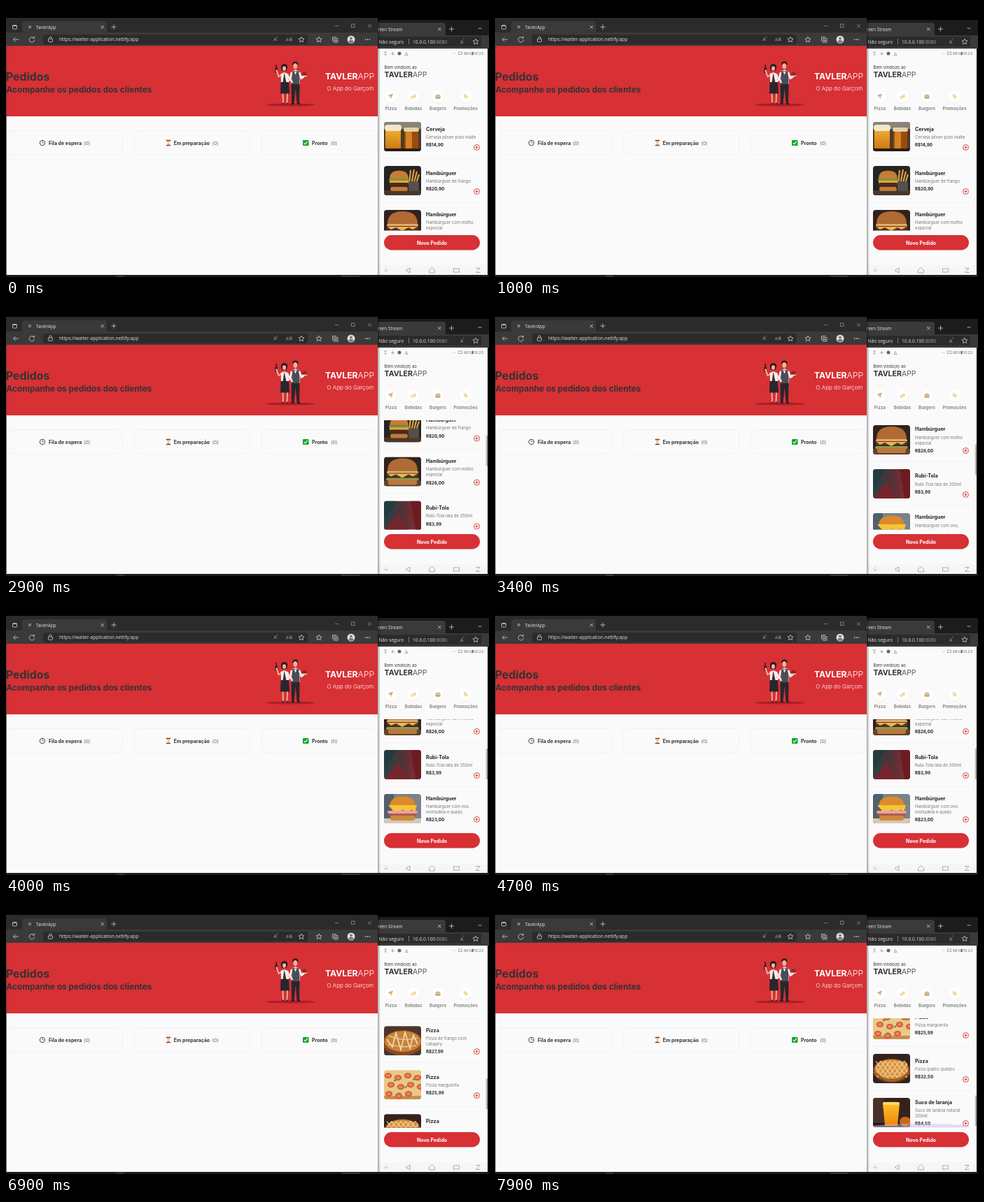
These frames come from a looping animation (690 by 388 pixels, 8 s). An HTML page:

```html
<!DOCTYPE html>
<html lang="pt-BR">
<head>
<meta charset="utf-8">
<title>TavlerApp</title>
<style>
html, body { margin: 0; width: 100%; height: 100%; overflow: hidden; background: #000; }
svg { display: block; }
text { font-family: Inter, sans-serif; white-space: pre; }
.ui { font-family: "Open Sans", sans-serif; font-size: 6.2px; fill: #e4e4e4; }
.url { font-size: 6.7px; }
.dim { fill: #a5a5a5; }
.line { fill: none; stroke: #d0d0d0; stroke-width: .8; }
.nav { fill: none; stroke: #999; stroke-width: .8; }
.b { font-weight: 700; }
.light { font-weight: 300; }
.dark { fill: #333; }
.mid { text-anchor: middle; }
.card { fill: #fafafa; stroke: #f0f0f0; stroke-width: .9; }
.label { font-size: 7px; }
.count { font-size: 6.8px; fill: #666; }
.cat { font-size: 6.2px; font-weight: 700; fill: #858585; text-anchor: middle; }
.name { font-size: 7.1px; font-weight: 700; fill: #222; }
.desc { font-size: 5.95px; fill: #777; }
.price { font-size: 6.2px; font-weight: 700; fill: #222; }
.status { font-size: 5.3px; fill: #666; }
</style>
</head>
<body>
<svg width="690" height="388" viewBox="0 0 690 388">
  <defs>
    <clipPath id="view"><rect x="531" y="165" width="157" height="156.500"/></clipPath>
    <clipPath id="photo"><rect width="53" height="42" rx="4"/></clipPath>
    <clipPath id="page"><rect y="57" width="531" height="328"/></clipPath>
    <linearGradient id="can"><stop offset="0" stop-color="#2a4145"/><stop offset=".45" stop-color="#4a3438"/><stop offset="1" stop-color="#962730"/></linearGradient>
    <linearGradient id="beer" x2="0" y2="1"><stop offset="0" stop-color="#f6b436"/><stop offset="1" stop-color="#c8730f"/></linearGradient>
    <linearGradient id="juice" x2="0" y2="1"><stop offset="0" stop-color="#ffc02a"/><stop offset="1" stop-color="#ee8406"/></linearGradient>
    <linearGradient id="glow" x2="0" y2="1"><stop offset="0" stop-color="#cdbcf0" stop-opacity=".25"/><stop offset="1" stop-color="#cdbcf0" stop-opacity=".65"/></linearGradient>
    <linearGradient id="shade"><stop offset="0" stop-opacity=".35"/><stop offset="1" stop-opacity="0"/></linearGradient>
  </defs>

  <!-- phone window -->
  <rect x="531" y="20" width="159" height="22" fill="#1c1c1d"/>
  <path d="M531 24h93q4 0 4 4v14h-97z" fill="#3a3a3a"/>
  <rect x="531" y="42" width="159" height="19" fill="#3a3a3a"/>
  <rect x="531" y="44" width="148" height="14" fill="#2b2b2b"/>
  <text class="ui" x="531" y="35.500">reen Stream</text>
  <path class="line" d="M617 31l4.500 4.500m0-4.500l-4.500 4.500M636.500 29.500v7m-3.500-3.500h7M674.500 32h5"/>
  <text class="ui url" x="532.500" y="53.500">Não seguro</text>
  <path class="line" d="M575.500 47v8" opacity=".6"/>
  <text class="ui url" x="581" y="53.500">10.0.0.100<tspan class="dim">:8080</tspan></text>
  <text class="ui url dim" x="649" y="53.500">A<tspan dy="-1.500">⁾</tspan></text>
  <use href="#star" x="224" y="3"/>
  <rect x="531" y="61" width="157" height="324" fill="#fafafa"/>

  <g class="nav" stroke="#777">
    <path d="M540 66h4m-2 0v4m-1.500 0h3M550 68.500h5m-2.500-3v5M570 70.500l2-4 2 4zM639 68h1m1 0h1"/>
    <rect x="646.500" y="66" width="5" height="3.600"/>
  </g>
  <circle cx="562" cy="68" r="2.500" fill="#666"/>
  <text class="status" x="654" y="70">66%</text>
  <rect x="665.500" y="65.800" width="2.200" height="4.400" fill="#666"/>
  <text class="status" x="668.500" y="70">10:23</text>

  <text class="dark" x="540.500" y="90.300" font-size="6">Bem vindo(e) ao</text>
  <text class="dark" x="540.500" y="102.400" font-size="10.600"><tspan class="b">TAVLER</tspan><tspan class="light">APP</tspan></text>

  <g id="cats"></g>
  <g clip-path="url(#view)">
    <g id="list"></g>
    <path id="edge" d="M540 321.500v-3q68-7 137 0v3z" fill="url(#glow)"/>
  </g>
  <rect id="bar" x="685.700" width="2.300" height="44" fill="#b4b4b4"/>

  <rect x="540" y="328" width="137" height="21.500" rx="10.700" fill="#d73035"/>
  <text class="b mid" x="608.500" y="341.500" font-size="7" fill="#fff">Novo Pedido</text>

  <rect x="531" y="371" width="157" height="14" fill="#f6f6f6"/>
  <g class="nav">
    <path d="M540.500 377.500l2.500 2.500 2.500-2.500M543 375v1M577 375v7l-6-3.500zM604.500 378l4-3.500 4 3.500v4h-8zM671 375.500h6l-5.500 6h6"/>
    <rect x="639.500" y="376" width="8" height="5"/>
  </g>
  <rect x="688" y="61" width="2" height="324" fill="#141414"/>
  <rect x="531" y="20" width="4" height="365" fill="url(#shade)"/>

  <!-- browser window -->
  <rect y="17" width="531" height="368" fill="#2b2b2b"/>
  <path d="M23 38V26q0-4 4-4h113q4 0 4 4v12z" fill="#3a3a3a"/>
  <rect y="38" width="531" height="19.500" fill="#3a3a3a"/>
  <rect x="53" y="41" width="378" height="14" rx="3" fill="#2b2b2b"/>
  <rect class="line" x="9.500" y="27.500" width="6" height="5.500" rx="1"/>
  <path class="line" d="M9.500 28.500h6" stroke-width="1.500"/>
  <rect x="32" y="28" width="4" height="4" fill="#777"/>
  <text class="ui" x="43" y="32.500">TavlerApp</text>
  <path class="line" d="M135.500 28l4.500 4.500m0-4.500l-4.500 4.500M154 26.500v7m-3.500-3.500h7"/>
  <g class="line" opacity=".6">
    <path d="M470 28.500h5M517 26l5 5m0-5l-5 5"/>
    <rect x="493.500" y="26" width="4.500" height="4.500"/>
  </g>
  <path class="line" d="M18 48h-7.500m3.200-3.200L10.500 48l3.200 3.200M40 46a3.700 3.700 0 1 0 .7 2.500M40.500 43.500V46H38M61.800 47v-1.500a1.700 1.700 0 0 1 3.400 0V47"/>
  <rect class="line" x="60.500" y="47" width="6" height="4.300" rx=".7"/>
  <text class="ui url" x="76" y="50.300">https://waiter-application.netlify.app</text>
  <text class="ui url dim" x="382.500" y="50.300">A<tspan dy="-1.500">⁾</tspan></text>
  <text class="ui dim" x="400" y="50.300">aあ</text>
  <path id="star" class="line" d="M447 44l1.200 2.600 2.800.3-2.100 1.900.6 2.800-2.500-1.500-2.500 1.500.6-2.800-2.100-1.900 2.800-.3z"/>
  <use href="#star" x="-25"/>
  <path class="line" d="M466.500 50.500v-6h5.500M468.500 46.500h5.500v5.500h-5.500zM471.200 47.500v3.500m-1.700-1.700h3.500"/>
  <circle cx="493" cy="48" r="5.500" fill="#dedede"/>
  <circle cx="493" cy="46.300" r="1.900" fill="#777"/>
  <path d="M489.500 51.500q0-2.700 3.500-2.700t3.500 2.700q-3.500 2.500-7 0z" fill="#777"/>
  <path d="M513 48h1.300m1.500 0h1.300m1.500 0h1.300" stroke="#ddd" stroke-width="1.300"/>

  <g clip-path="url(#page)">
    <rect y="57" width="531" height="328" fill="#fafafa"/>
    <rect y="57" width="531" height="101" fill="#d73035"/>
    <text class="b dark" x="0" y="106.500" font-size="15.800">Pedidos</text>
    <text class="b dark" x=".5" y="123.700" font-size="11.800">Acompanhe os pedidos dos clientes</text>
    <text x="456" y="105.200" font-size="12.200" fill="#fff"><tspan class="b">TAVLER</tspan><tspan class="light">APP</tspan></text>
    <text class="light" x="458.500" y="120.500" font-size="8" fill="#fff">O App do Garçom</text>

    <!-- waitress and waiter -->
    <ellipse cx="406.500" cy="141.500" rx="35.500" ry="2" fill="#a82025"/>
    <path d="M385.300 84h1.800v4l1 1.500v6h-3.800v-6l1-1.500z" fill="#4a1a20"/>
    <path d="M387 94l2.500 7 5-3" fill="none" stroke="#f0b597" stroke-width="2"/>
    <circle cx="386.700" cy="93" r="1.400" fill="#f0b597"/>
    <path d="M393 90q-1-7 4.500-7t4.500 6l-1.500 4h-6z" fill="#2c1d25"/>
    <ellipse cx="397.500" cy="89.500" rx="2.500" ry="3.300" fill="#f0b597"/>
    <path d="M392.500 97l5-2 5 2 1 12.500h-10.500z" fill="#f4ece8"/>
    <path d="M402 97.500l3 8-4 5" fill="none" stroke="#f4ece8" stroke-width="2.300"/>
    <path d="M397.500 95.500l-2 14h5z" fill="#333139"/>
    <path d="M392.500 109h11.500l1 16.500h-13z" fill="#29262e"/>
    <path d="M395.500 125.500l.5 14m6-14l-.5 14" stroke="#f0b597" stroke-width="1.800"/>
    <path d="M393.500 140.500h3.500v-2.500zM399.500 140.500h3.500v-2.500z" fill="#29262e"/>
    <path d="M409 84q0-4.500 4.500-4.500t4 5z" fill="#2c1d25"/>
    <ellipse cx="413.300" cy="86" rx="2.800" ry="4" fill="#f0b597"/>
    <path d="M408 94l5.500-3 6 3 .5 18h-12z" fill="#f4f1f0"/>
    <path d="M408.500 94l2.500-1.500 2.500 6 2.500-6 3 1.500.5 18.500h-11.500z" fill="#4a4d57"/>
    <path d="M411.800 92.500l3.200 1.800v-1.800l-3.200 1.800z" fill="#222"/>
    <path d="M408 95l-2 9 3 6M419 95l3 8.500 4-2.500" fill="none" stroke="#f4f1f0" stroke-width="2.600"/>
    <path d="M421 99.500h10l-2 1.600h-6z" fill="#eee"/>
    <path d="M422.500 99.500q.5-5 4-5t3.500 5z" fill="#8d2a26"/>
    <path d="M407.500 112h12l-.5 28h-3.300l-2-22-2.300 22h-3.400z" fill="#29262e"/>
    <path d="M406 141h5.500v-2zM415.500 141h5.500l-2-2z" fill="#1d1b21"/>

    <rect class="card" x=".5" y="178.500" width="166" height="34.500" rx="8"/>
    <rect class="card" x="183" y="178.500" width="165.500" height="34.500" rx="8"/>
    <rect class="card" x="365" y="178.500" width="165.500" height="34.500" rx="8"/>
    <circle cx="52" cy="196" r="3.700" fill="#fff" stroke="#444"/>
    <path d="M52 193.500v2.500h2" fill="none" stroke="#444" stroke-width=".8"/>
    <path d="M229.500 192.800h5q0 2-1.800 3.400 1.800 1.300 1.800 3.400h-5q0-2 1.800-3.400-1.800-1.300-1.800-3.400z" fill="#e9c9a0"/>
    <path d="M230 199.500q2-3 4 0z" fill="#c98332"/>
    <path d="M228.800 192.500h6.400M228.800 199.700h6.400" stroke="#85402c" stroke-width="1.300"/>
    <rect x="424" y="192" width="8.500" height="8" rx="1" fill="#14a52b"/>
    <path d="M425.800 196l1.700 1.900 3.300-4" fill="none" stroke="#fff" stroke-width="1.100"/>
    <text class="b dark label" x="61" y="198.600">Fila de espera</text><text class="count" x="111" y="198.600">(0)</text>
    <text class="b dark label" x="239.700" y="198.600">Em preparação</text><text class="count" x="294.500" y="198.600">(0)</text>
    <text class="b dark label" x="437" y="198.600">Pronto</text><text class="count" x="464" y="198.600">(0)</text>
  </g>
  <rect y="57" width="1" height="328" fill="#333" opacity=".7"/>
  <rect y="385" width="690" height="3" fill="#1b1b1b"/>
  <path d="M158 387h11M479 387h26" stroke="#555"/>
</svg>
<script>
const $ = id => document.getElementById(id);
const rect = (x, y, w, h, fill, rx = 0) => `<rect x="${x}" y="${y}" width="${w}" height="${h}" fill="${fill}" rx="${rx}"/>`;
const oval = (x, y, rx, ry, fill) => `<ellipse cx="${x}" cy="${y}" rx="${rx}" ry="${ry}" fill="${fill}"/>`;
const path = (d, fill) => `<path d="${d}" fill="${fill}"/>`;
const stroke = (d, color, w) => `<path d="${d}" fill="none" stroke="${color}" stroke-width="${w}"/>`;
const back = fill => rect(0, 0, 53, 42, fill);

const bun = (x, y, w, color) => path(`M${x} ${y}q0-${w * .42} ${w / 2}-${w * .42}t${w / 2} ${w * .42}z`, color);
const lattice = (color, w) => {
  let d = '';
  for (let i = -3; i < 9; i++) d += `M${i * 8} 2l20 36M${i * 8 + 8} 2l-20 36`;
  return stroke(d, color, w);
};
const slices = () => {
  let s = '';
  for (let i = 0; i < 11; i++) {
    const row = i / 4 | 0, x = 6 + i % 4 * 14 + row * 4 % 7, y = 8 + row * 13 + i % 2 * 3;
    s += oval(x, y, 5, 4, '#d5512e') + oval(x, y, 3.2, 2.4, '#e9835a');
  }
  return s;
};

const photos = [
  back('#4b3a2d') + rect(0, 0, 53, 10, '#8b8377') + rect(2, 7, 22, 35, 'url(#beer)', 2) + rect(1, 4, 24, 9, '#f3e6cb', 4) +
    rect(29, 12, 20, 30, '#9a4b10', 2) + rect(31, 14, 9, 25, '#d58220', 2) + rect(28, 8, 22, 6, '#e5cfa9', 3) + rect(0, 38, 53, 4, '#2b1d14'),
  back('#262322') + rect(0, 35, 53, 7, '#4b3729') + stroke('M36 27l2-21M39 27l4-22M42 27l5-19M45 28l5-16', '#dda23c', 2.2) + rect(35, 22, 15, 14, '#55504c', 2) +
    bun(8, 18, 27, '#c67c34') + rect(7, 18, 29, 4, '#79963e', 2) + rect(8, 21, 27, 4, '#e0a83b', 1) + rect(8, 24, 27, 6, '#4d2a1a', 2) + rect(9, 30, 25, 6, '#bd7a3a', 3),
  back('#30231f') + rect(0, 34, 53, 8, '#63432c') + bun(5, 20, 43, '#b06a34') + rect(4, 20, 45, 4, '#e2ae70', 2) +
    rect(4, 23, 45, 6, '#61301f', 3) + path('M5 24h43l-7 4-6-3-9 5-9-5-7 3z', '#e8b850') + rect(3, 30, 47, 4, '#8b9950', 2) + rect(6, 33, 41, 7, '#b9783c', 3),
  back('url(#can)') + path('M0 42L20 18 34 42z', '#75262c') + path('M38 0h15v42h-8z', '#6d1c24') + path('M0 0h18L4 24H0z', '#233c40'),
  back('#78838c') + rect(0, 0, 14, 42, '#52606c') + rect(0, 35, 53, 7, '#d9c7b4') + bun(8, 19, 37, '#dc8a2c') + path('M6 16h41l-3 10-5-4-6 9-6-9-8 6-6-4z', '#f6c437') +
    rect(5, 24, 43, 4, '#eca1a0', 2) + rect(7, 28, 40, 4, '#b05a55', 2) + rect(9, 31, 35, 7, '#cd8a3c', 3),
  back('#49372e') + oval(27, 24, 29, 18, '#8d4a1e') + oval(27, 22, 26, 15, '#c7833a') + stroke('M4 19l8 11 5-20 7 24 6-25 7 23 5-19 6 13', '#f3dfb4', 1.6) + stroke('M7 14q20 9 41 3M6 26q20 6 40 2', '#eccf98', 1.3),
  back('#e9c888') + rect(0, 37, 53, 5, '#c98d4d') + slices() + stroke('M14 14l3 2M30 25l3-2M41 13l3 1M20 33l4 1', '#5a8440', 1.8),
  back('#33231c') + oval(26.500, 24, 27, 17, '#7e431d') + oval(26.500, 22, 24, 14, '#d79143') +
    `<svg x="4" y="9" width="45" height="26" viewBox="0 0 53 40" preserveAspectRatio="none">${lattice('#f0cd8c', 1.6)}</svg>` + stroke('M2 26q25 24 49 0', '#a6622a', 3),
  back('#35221f') + rect(0, 0, 16, 42, '#4a302a') + rect(0, 36, 53, 6, '#1f1413') + path('M14 8h24l-3 32H17z', 'url(#juice)') + rect(14, 6, 24, 4, '#ffd866', 2) + oval(46, 34, 8, 7, '#c96a12')
];

const menu = [
  ['Cerveja', '14,90', 'Cerveja pilsen puro malte'],
  ['Hambúrguer', '20,90', 'Hambúrguer de frango'],
  ['Hambúrguer', '26,00', 'Hambúrguer com molho', 'especial'],
  ['Rubi-Tola', '3,99', 'Rubi-Tola lata de 350ml'],
  ['Hambúrguer', '23,00', 'Hambúrguer com ovo,', 'mortadela e queijo'],
  ['Pizza', '27,99', 'Pizza de frango com', 'catupiry'],
  ['Pizza', '25,99', 'Pizza marguerita'],
  ['Pizza', '32,50', 'Pizza quatro queijos'],
  ['Suco de laranja', '4,50', 'Suco de laranja natural', '300ml']
];

const text = (cls, y, s) => `<text class="${cls}" x="60" y="${y}">${s}</text>`;
$('list').innerHTML = menu.map(([name, price, line1, line2], i) => {
  const shift = line2 ? -4 : 0;
  return `<g class="item" transform="translate(540 ${166 + i * 63})">
    <g clip-path="url(#photo)">${photos[i]}</g>` +
    text('name', 12.500 + shift, name) + text('desc', 23.700 + shift, line1) +
    (line2 ? text('desc', 27.700, line2) : '') + text('price', line2 ? 39 : 35, 'R$' + price) +
    `<circle cx="132.500" cy="36.500" r="4" fill="none" stroke="#d73035" stroke-width=".9"/>` +
    stroke('M130.300 36.500h4.400m-2.200-2.200v4.400', '#d73035', .9) + rect(0, 52, 137, .7, '#efefef') + '</g>';
}).join('');

const cats = [
  [550, 'Pizza', path('M-4-1l7-3-2 8z', '#e8a94a') + oval(0, -1, 1, 1, '#c8452c') + stroke('M-4-1l7-3', '#a8672e', 1.2)],
  [582, 'Bebidas', rect(-4, -1, 4, 5, '#f3cf6b', 1) + rect(0, -3, 4, 5, '#f0bf55', 1) + rect(-4, -2, 4, 1.500, '#f5efdf') + rect(0, -4, 4, 1.500, '#f5efdf')],
  [617, 'Burgers', bun(-4, 0, 8, '#d18a3d') + rect(-4, 0, 8, 1.300, '#82a84c') + rect(-4, 1.200, 8, 1.300, '#70402a') + rect(-3.500, 2.400, 7, 1.600, '#d18a3d', .8)],
  [656.500, 'Promoções', path('M-3-4h3l4 5-3 3-4-4z', '#eec25a') + oval(-1.500, -2.500, .7, .7, '#fff')]
];
$('cats').innerHTML = cats.map(([x, label, icon]) =>
  oval(x, 130, 9.500, 9.500, '#f1f1f1') + oval(x, 129.500, 9, 9, '#fff') +
  `<g transform="translate(${x} 129.500) scale(.9)" opacity=".65">${icon}</g><text class="cat" x="${x}" y="148.500">${label}</text>`).join('');

// finger swipes: [start ms, length ms, distance px]
const swipes = [[2476, 524, 75], [3165, 825, 71], [4800, 700, 95], [5870, 430, 62], [6895, 705, 88]];
const clamp = (v, min, max) => Math.min(max, Math.max(min, v));
const fling = p => 1 - (1 - clamp(p, 0, 1)) ** 3;
const pressed = document.querySelectorAll('.item')[2];

function draw() {
  const t = Math.floor((performance.now() + 5) / 100) * 100 % 8000;
  const y = swipes.reduce((sum, [start, length, dist]) => sum + dist * fling((t - start) / length), 0);
  const moving = swipes.some(([start, length]) => t > start && t < start + length + 800);
  $('list').setAttribute('transform', `translate(0 ${-y})`);
  $('bar').setAttribute('y', 166 + y * .28);
  $('bar').style.opacity = moving ? 1 : 0;
  $('edge').style.opacity = t >= 7900 ? 1 : t >= 7800 ? .5 : 0;
  pressed.style.opacity = t < 2300 ? 1 : clamp((t - 2450) / 250, .25, 1);
  requestAnimationFrame(draw);
}
draw();
</script>
</body>
</html>
```
